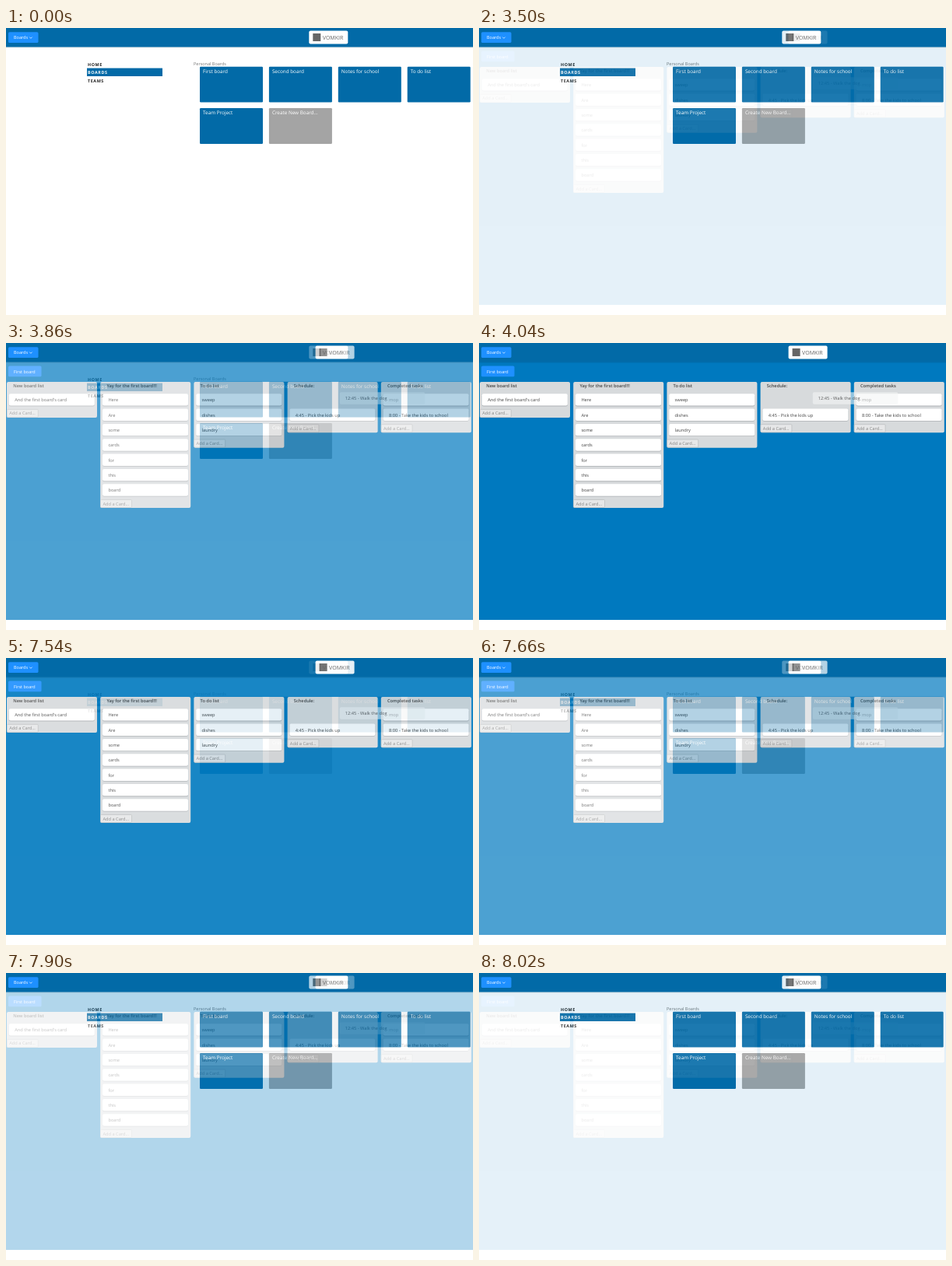
Animation, 600 px wide and 369 px high, one loop 8.08 s. Source, as an HTML page:

```html
<!DOCTYPE html>
<html lang="en">
<head>
<meta charset="utf-8">
<title>Task boards</title>
<style>
  html, body { margin: 0; width: 100%; height: 100%; overflow: hidden; background: #fff; }
  svg { display: block; width: 100%; height: 100%; }
  text { font: 5.7px "Open Sans", "Noto Sans", sans-serif; text-rendering: geometricPrecision; white-space: pre; }
  .button { font-size: 5.5px; fill: #fff; }
  .tile { font-size: 6.35px; fill: #fff; }
  .menu { font-size: 5.4px; font-weight: 700; letter-spacing: .6px; fill: #222; }
  .section { font-size: 5.5px; fill: #777; }
  .title { font-weight: 600; fill: #444; }
  .card { fill: #444; }
  .add { fill: #858585; }
  .brand { font-size: 7px; fill: #666; }
</style>
</head>
<body>
<svg viewBox="0 0 600 369">
  <g id="home"></g>
  <g id="board"></g>
</svg>
<script>
const NAVY = '#026aa7', BLUE = '#0079bf', BRIGHT = '#1e90ff', LIST = '#d7dadc';

const rect = (x, y, w, h, fill, r = 0, extra = '') =>
  `<rect x="${x}" y="${y}" width="${w}" height="${h}" rx="${r}" fill="${fill}" ${extra}/>`;
const text = (x, y, kind, label, extra = '') =>
  `<text x="${x}" y="${y}" class="${kind}" ${extra}>${label}</text>`;

function header(logoX) {
  return rect(0, 24.4, 600, 1, '#000', 0, 'opacity=".12"') +
    rect(0, 0, 600, 24.5, NAVY) +
    rect(3, 5.3, 38.5, 13.8, BRIGHT, 1.6) +
    text(10, 14.4, 'button', 'Boards') +
    '<path d="M30.2 11.6l1.7 1.7 1.7-1.7" fill="none" stroke="#fff" stroke-width=".7"/>' +
    rect(logoX, 3.5, 50, 17, '#fff', 2) +
    rect(logoX + 5, 7, 10, 10, '#666') +
    text(logoX + 17.5, 15, 'brand', 'VOMKIR');
}

function homePage() {
  const tiles = ['First board', 'Second board', 'Notes for school', 'To do list',
    'Team Project', 'Create New Board...'];
  return rect(0, 0, 600, 369, '#fff') + header(389.3) +
    rect(104, 51.6, 97, 10.4, NAVY) +
    text(105, 48.5, 'menu', 'HOME') +
    text(105, 59, 'menu', 'BOARDS', 'style="fill:#fff"') +
    text(105, 69.8, 'menu', 'TEAMS') +
    text(241, 47.6, 'section', 'Personal Boards') +
    tiles.map((label, i) => {
      const x = 249 + i % 4 * 88.9, y = 49.7 + Math.floor(i / 4) * 53.4;
      return rect(x, y, 81, 45.8, i === 5 ? '#a4a4a4' : NAVY, 1.2) +
        text(x + 4, y + 7.8, 'tile', label);
    }).join('');
}

function list({ title, cards }, i) {
  const x = 1 + i * 120.2, step = 19.35, addY = 65.6 + cards.length * step;
  return rect(x, 50, 116, addY + 11 - 50, LIST, 2) +
    text(x + 8.2, 57, 'title', title) +
    cards.map((label, row) => {
      const y = 65.2 + row * step;
      return label && rect(x + 2.8, y + .8, 110, 15.4, '#aeb2b5', 2) +
        rect(x + 2.8, y, 110, 15.4, '#fff', 2) +
        text(x + 10.2, y + 10, 'card', label);
    }).join('') +
    rect(x + .3, addY + .4, 40, 10, '#e6e7e8', 1, 'stroke="#b4b7b9" stroke-width=".6"') +
    text(x + 3.2, addY + 7.5, 'add', 'Add a Card...');
}

function boardPage() {
  const lists = [
    { title: 'New board list', cards: ["And the first board's card"] },
    { title: 'Yay for the first board!!!', cards: ['Here', 'Are', 'some', 'cards', 'for', 'this', 'board'] },
    { title: 'To do list', cards: ['sweep', 'dishes', 'laundry'] },
    { title: 'Schedule:', cards: ['', '4:45 - Pick the kids up'] },
    { title: 'Completed tasks', cards: ['mop', '8:00 - Take the kids to school'] }
  ];
  return rect(0, 0, 600, 356, BLUE) + header(397.6) +
    rect(3, 29.5, 42.5, 13.8, BRIGHT, 1.6) +
    text(10, 38.6, 'button', 'First board') +
    lists.map(list).join('') +
    // card being dragged
    rect(428.8, 63.2, 109.5, 15.6, '#f4f5f6', 2, 'opacity=".6"') +
    text(435.8, 73.2, 'card', '12:45 - Walk the dog', 'opacity=".85"');
}

const home = document.getElementById('home');
const board = document.getElementById('board');
home.innerHTML = homePage();
board.innerHTML = boardPage();

const LOOP = 8080, FADE_IN = 3500, FADE_OUT = 7540, STEP = 60;
// ten-percent steps, the first one taken at once
const stepped = (t, from) => Math.min(10, Math.max(0, Math.floor((t - from) / STEP) + 1)) / 10;

const start = performance.now();
function draw() {
  const t = (performance.now() - start) % LOOP;
  board.setAttribute('opacity', stepped(t, FADE_IN) - stepped(t, FADE_OUT));
  requestAnimationFrame(draw);
}
draw();
</script>
</body>
</html>
```
